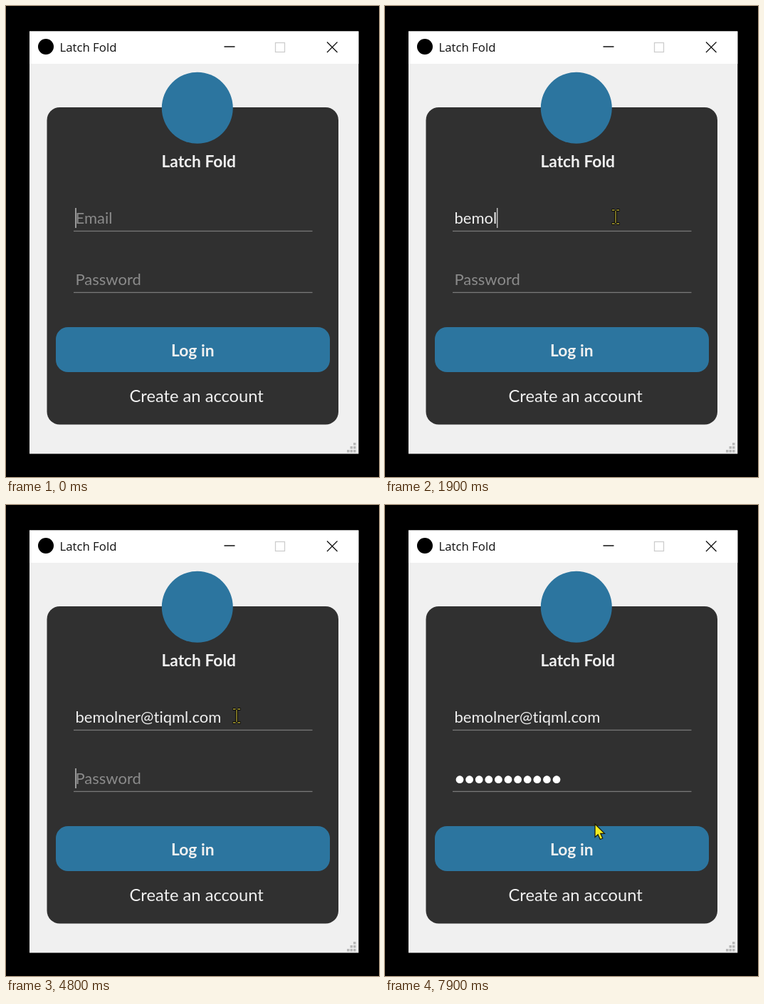
An HTML page that plays this animation: 524 by 660 pixels, repeating every 8000 ms.

```html
<!DOCTYPE html>
<html lang="en">
<head>
<meta charset="utf-8">
<title>Login form</title>
<style>
  html, body { margin: 0; width: 100%; height: 100%; overflow: hidden; background: #000; }
  svg { display: block; width: 524px; height: 660px; }
  text { font: 22px Lato, Carlito, sans-serif; font-variant-ligatures: none; fill: #f0f0f0; white-space: pre; }
  .bold { font-weight: 700; font-size: 22.8px; text-anchor: middle; }
  .link { font-size: 23.7px; text-anchor: middle; }
  .bar { font: 16.8px "Open Sans", "Noto Sans", sans-serif; fill: #111; }
  .hint { fill: #8b8b8b; }
  .rule { fill: #787878; }
  .blue { fill: #2c759f; }
</style>
</head>
<body>
<svg viewBox="0 0 524 660">
  <rect width="524" height="660"/>
  <rect x="33" y="35.500" width="462.300" height="592" fill="#f0f0f0"/>
  <rect x="33" y="35.500" width="462.300" height="45.500" fill="#fff"/>

  <circle cx="56" cy="57" r="11"/>
  <text class="bar" x="75.500" y="64">Latch Fold</text>
  <g fill="none" stroke="#111" stroke-width="1.300">
    <path d="M306.500 57h15M451 50.500l14.500 14.500M465.500 50.500L451 65"/>
    <rect x="378.500" y="51.500" width="13" height="13" stroke="#cdcdcd"/>
  </g>
  <path d="M488 612h3.500v3.500h-3.500zM483.500 617h3.500v3.500h-3.500zM488 617h3.500v3.500h-3.500zM479 622h3.500v3.500h-3.500zM483.500 622h3.500v3.500h-3.500zM488 622h3.500v3.500h-3.500z" fill="#b8b8b8"/>

  <rect x="57.500" y="142" width="409.500" height="444.500" rx="18" fill="#303030"/>
  <circle class="blue" cx="268.800" cy="142.800" r="50"/>
  <text class="bold" x="270.700" y="226">Latch Fold</text>

  <rect class="rule" x="95" y="314.800" width="335.500" height="1.300"/>
  <rect class="rule" x="95" y="400.800" width="335.500" height="1.300"/>
  <text class="hint" id="emailHint" x="97.500" y="305">Email</text>
  <text id="email" x="97.500" y="305"></text>
  <text class="hint" id="passHint" x="97.500" y="391">Password</text>
  <g id="dots" fill="#fff"></g>
  <rect id="caret" width="1.400" height="28" fill="#c4c4c4"/>

  <rect class="blue" x="70" y="450" width="385" height="63" rx="17"/>
  <text class="bold" x="262.300" y="490.500">Log in</text>
  <text class="link" x="267.700" y="555">Create an account</text>

  <g id="beam" fill="none">
    <path d="M-5.500-9.500h4M1.500-9.500h4M-5.500 9.500h4M1.500 9.500h4M0-9v18" stroke="#000" stroke-width="3.400"/>
    <path d="M-5-9.500h3.500M1.500-9.500h3.500M-5 9.500h3.500M1.500 9.500h3.500M0-8.500v17" stroke="#b5a936" stroke-width="1.300"/>
  </g>
  <path id="arrow" d="M0 0V18.500L4.200 14.700L7.300 21.500L10.800 20L7.800 13.300H13.500Z" fill="#f3ed20" stroke="#1a1a08" stroke-width="1.200"/>
</svg>
<script>
  const LOOP = 8000, LEFT = 98, PITCH = 13.6, ADDRESS = "bemolner@tiqml.com";
  const FOCUS_PASSWORD = 4700;
  const $ = id => document.getElementById(id);

  // Time of each keystroke.
  const emailKeys = [1300, 1500, 1700, 1800, 1900, 2100, 2300, 2400, 2900,
                     3200, 3300, 3500, 3600, 3800, 4100, 4300, 4400, 4500];
  const passKeys = [5400, 5600, 5800, 5900, 6100, 6100, 6300, 6500, 6700, 6900, 7100];

  // Pointer stops: time, x, y, shape.
  const stops = [
    [100, 508, 602, "arrow"], [200, 486, 500, "arrow"], [300, 448, 380, "arrow"],
    [400, 372, 305, "beam"], [500, 324, 295.5, "beam"],
    [7700, 320, 335, "arrow"], [7800, 308, 395, "beam"], [7900, 295, 447, "arrow"]
  ];

  const dots = passKeys.map((_, i) => {
    const dot = document.createElementNS("http://www.w3.org/2000/svg", "circle");
    dot.setAttribute("cx", 105 + PITCH * i);
    dot.setAttribute("cy", 384.7);
    dot.setAttribute("r", 5.4);
    return $("dots").appendChild(dot);
  });

  const pressed = (keys, t) => keys.filter(k => k <= t).length;
  const show = (el, on) => el.setAttribute("visibility", on ? "visible" : "hidden");

  function draw(t) {
    const typed = pressed(emailKeys, t), hidden = pressed(passKeys, t);
    $("email").textContent = ADDRESS.slice(0, typed);
    show($("emailHint"), !typed);
    show($("passHint"), !hidden);
    dots.forEach((dot, i) => show(dot, i < hidden));

    const inPassword = t >= FOCUS_PASSWORD;
    const width = inPassword ? hidden * PITCH : typed ? $("email").getComputedTextLength() : 0;
    $("caret").setAttribute("x", LEFT - 0.7 + width);
    $("caret").setAttribute("y", inPassword ? 369 : 283);
    show($("caret"), !(t >= 700 && t < 1200) && t < 7700);

    const stop = stops.filter(s => s[0] <= t).pop();
    for (const shape of ["beam", "arrow"]) {
      const on = !!stop && stop[3] === shape;
      show($(shape), on);
      if (on) $(shape).setAttribute("transform", `translate(${stop[1]} ${stop[2]})`);
    }
  }

  const start = performance.now();
  function tick() {
    draw((performance.now() - start) % LOOP);
    requestAnimationFrame(tick);
  }
  tick();
</script>
</body>
</html>
```
